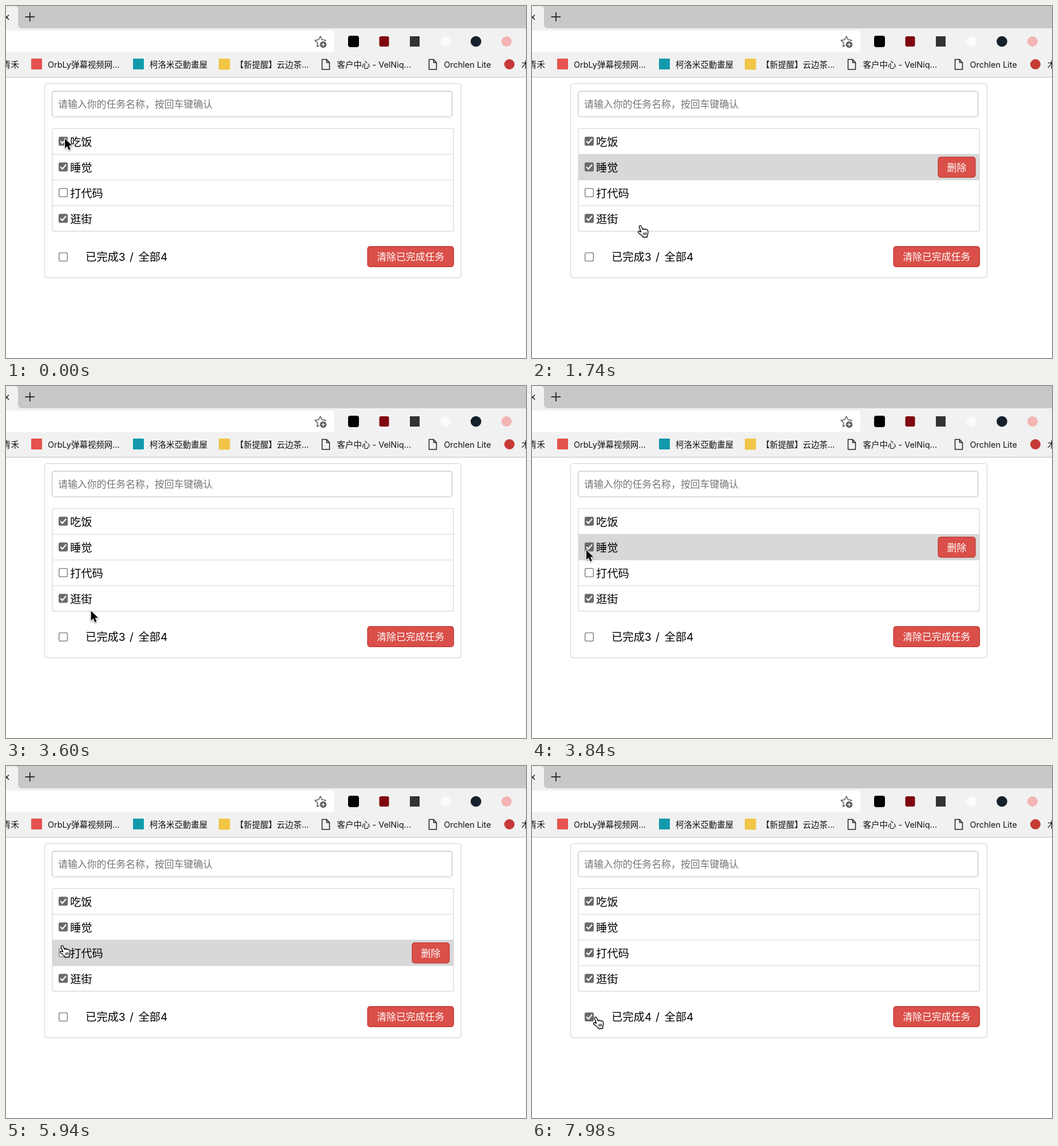
Write an HTML page with a canvas that moves like this. It is 909 px wide and 616 px high and loops after 8 s.

```html
<!DOCTYPE html>
<html lang="zh">
<head>
<meta charset="utf-8">
<title>任务列表</title>
<style>
html, body { margin: 0; width: 100%; height: 100%; overflow: hidden; background: #fff; }
canvas { display: block; }
</style>
</head>
<body>
<canvas id="stage" width="909" height="616"></canvas>
<script>
const ctx = document.getElementById('stage').getContext('2d');
const LOOP = 8000, STEP = 60;
const FONT = 'Inter, "Noto Sans CJK SC", "Noto Sans CJK", sans-serif';
const TASKS = ['吃饭', '睡觉', '打代码', '逛街'];
const ROW_TOP = 214.5, ROW_H = 45;

// Pointer tip: time, x, y
const PATH = [
  [0, 103, 232], [240, 103, 232], [420, 101, 229], [1200, 101, 229],
  [1440, 160, 274], [1620, 180, 292], [1740, 189, 384], [1860, 191, 464],
  [2640, 192, 462], [2880, 192, 451], [3360, 192, 449], [3540, 162, 420],
  [3840, 95, 287], [3960, 97, 271], [5220, 97, 271], [5520, 98, 314],
  [6960, 98, 314], [7080, 98, 320], [7200, 101, 358], [7440, 108, 424],
  [7740, 111, 439], [8000, 111, 439]
];
// Hovered row from each time on, -1 for none
const HOVER = [[0, -1], [240, 0], [1380, 1], [1800, -1], [3720, 1], [5400, 2], [7260, 3], [7440, -1]];
// Checkbox clicks: time, row
const CLICKS = [[600, 0], [1140, 0], [4260, 1], [4860, 1], [6000, 2], [6480, 2], [7860, 2]];

function pointerAt(t) {
  const i = Math.max(1, PATH.findIndex(p => p[0] >= t));
  const [t0, x0, y0] = PATH[i - 1], [t1, x1, y1] = PATH[i];
  const k = (t - t0) / (t1 - t0);
  return [x0 + (x1 - x0) * k, y0 + (y1 - y0) * k];
}

function box(x, y, w, h, r, fill, stroke, lw = 1.2) {
  ctx.beginPath();
  ctx.roundRect(x, y, w, h, r);
  if (fill) { ctx.fillStyle = fill; ctx.fill(); }
  if (stroke) { ctx.strokeStyle = stroke; ctx.lineWidth = lw; ctx.stroke(); }
}

function disc(x, y, r, fill) {
  ctx.beginPath();
  ctx.arc(x, y, r, 0, Math.PI * 2);
  ctx.fillStyle = fill;
  ctx.fill();
}

function line(points, color, lw) {
  ctx.beginPath();
  points.forEach(([x, y]) => ctx.lineTo(x, y));
  ctx.strokeStyle = color;
  ctx.lineWidth = lw;
  ctx.stroke();
}

// y is the middle of the line
function text(s, x, y, size, color = '#000', align = 'left') {
  ctx.font = `${size}px ${FONT}`;
  ctx.textAlign = align;
  ctx.fillStyle = color;
  ctx.fillText(s, x, y + size * 0.38);
}

function docIcon(x) {
  const p = new Path2D('M1 1H9L14 6.5V18.5H1ZM9 1V6.5H14');
  ctx.save();
  ctx.translate(x, 92.5);
  ctx.strokeStyle = '#222';
  ctx.lineWidth = 1.5;
  ctx.stroke(p);
  ctx.restore();
}

function starIcon() {
  ctx.beginPath();
  for (let i = 0; i < 10; i++) {
    const a = -Math.PI / 2 + i * Math.PI / 5, r = i % 2 ? 5 : 10;
    ctx.lineTo(549.5 + r * Math.cos(a), 63 + r * Math.sin(a));
  }
  ctx.closePath();
  ctx.lineJoin = 'round';
  ctx.strokeStyle = '#5c5c5c';
  ctx.lineWidth = 1.5;
  ctx.stroke();
  disc(554.5, 67.5, 7, '#fff');
  disc(554.5, 67.5, 5.7, '#5c5c5c');
  line([[551.3, 67.5], [557.7, 67.5]], '#fff', 1.3);
  line([[554.5, 64.3], [554.5, 70.7]], '#fff', 1.3);
}

function browser() {
  ctx.fillStyle = '#c8c8c8';
  ctx.fillRect(0, 0, 909, 39);
  ctx.fillStyle = '#f1f1f1';
  ctx.fillRect(0, 39, 909, 85);
  ctx.fill(new Path2D('M0 0H15Q21 0 21 6V32Q21 39 28 39H0Z'));
  ctx.fillStyle = '#c9c9c9';
  ctx.fillRect(0, 124, 909, 1.3);
  line([[-3, 15.5], [5, 24]], '#222', 1.6);
  line([[-3, 24], [5, 15.5]], '#222', 1.6);
  line([[33.5, 19], [50, 19]], '#222', 1.8);
  line([[41.8, 11], [41.8, 27]], '#222', 1.8);

  box(-10, 43, 584, 37.5, 5, '#fff');
  starIcon();
  box(598, 52, 19, 20, 4, '#000');
  box(652.5, 53, 17, 18, 3, '#80060f');
  box(706, 53, 17, 18, 0, '#333');
  disc(768, 62, 9, '#fbfbfb');
  disc(821.5, 62, 9.3, '#14202b');
  disc(875, 62, 9, '#f3b4b3');

  box(44, 92, 19, 19, 1, '#e5534f');
  box(222, 92, 19, 19, 1, '#129aac');
  box(372, 92, 19.5, 19.5, 1, '#f2c547');
  docIcon(551.5);
  docIcon(738.5);
  disc(880, 102, 9, '#c63a36');
  const label = (s, x, align) => text(s, x, 102, 14.48, '#111', align);
  label('青禾', 23, 'right');
  label('OrbLy弹幕视频网...', 73);
  label('柯洛米亞動畫屋', 251);
  label('【新提醒】云边茶...', 401);
  label('客户中心 - VelNiq...', 578.5);
  label('Orchlen Lite', 765.5);
  label('木', 901);
}

function checkbox(cy, on) {
  if (!on) return box(92.7, cy - 7.2, 14.6, 14.6, 2.5, '#fff', '#747474', 1.3);
  box(92, cy - 7.8, 16, 15.8, 2.8, '#6b6b6b');
  ctx.lineJoin = 'miter';
  line([[95.2, cy + 0.3], [98.6, cy + 3.6], [105, cy - 4]], '#fff', 2.2);
}

function button(s, x, y, w) {
  box(x + 0.5, y + 0.5, w - 1, 35.5, 4.5, '#da4f49', '#bd362f');
  text(s, x + w / 2, y + 18.3, 16.9, '#fff', 'center');
}

function app(done, hover) {
  box(67.5, 135.7, 728, 340, 5, '#fff', '#d6d6d6');
  box(80.7, 149.2, 699, 44.8, 4.5, '#fff', '#bfbfbf');
  text('请输入你的任务名称，按回车键确认', 91, 171.5, 16.9, '#757575');

  box(81, ROW_TOP, 701.3, ROW_H * 4 - 0.3, 2, '#fff', '#d6d6d6');
  TASKS.forEach((name, i) => {
    const y = ROW_TOP + ROW_H * i;
    if (i) line([[81, y], [782, y]], '#d6d6d6', 1.2);
  });
  if (hover >= 0) {
    ctx.fillStyle = '#d8d8d8';
    ctx.fillRect(81, ROW_TOP + ROW_H * hover - 0.5, 701.3, ROW_H + 1);
    button('删除', 709.5, ROW_TOP + ROW_H * hover + 4.3, 66);
  }
  TASKS.forEach((name, i) => {
    const y = ROW_TOP + ROW_H * i;
    checkbox(y + 22, done[i]);
    text(name, 112, y + 23, 19.3);
  });

  const count = done.filter(Boolean).length;
  checkbox(439, count === TASKS.length);
  text('已完成' + count, 139, 438.7, 19.3);
  text('/', 216, 438.7, 19.3);
  text('全部' + TASKS.length, 231.5, 438.7, 19.3);
  button('清除已完成任务', 631.5, 420.3, 151.5);
}

const ARROW = new Path2D('M0 0V17L4 13.4L6.8 20L9.8 18.7L7 12.3H12.4Z');
const HAND = new Path2D('M6.5 12.5L3.2 3.8C2.4 1.5 5.4 0 6.6 2.4L9.2 8C9.8 6.5 12 6.8 12.4 8.2C13 7 15 7.3 15.4 8.8C16.4 7.8 18 8.6 18.3 10.2C19 13 18.8 15 17.6 17.5L17.3 21L10 21.6L9.2 19.5C7 18 5 15.8 2.5 14.2C.6 13 1.2 10.9 3 11C4.5 11.1 5.5 11.8 6.5 12.5Z');
const CREASES = new Path2D('M10.7 13.5L11.2 18M13 13.3L13.4 17.8M15.3 13.1L15.5 17.6');

function pointer(x, y, hand) {
  ctx.save();
  ctx.translate(hand ? x - 4.8 : x, hand ? y - 1 : y);
  ctx.lineJoin = 'round';
  ctx.shadowColor = 'rgba(0,0,0,.35)';
  ctx.shadowBlur = 3;
  ctx.shadowOffsetY = 1.5;
  ctx.fillStyle = ctx.strokeStyle = '#fff';
  ctx.lineWidth = 2.2;
  if (hand) ctx.fill(HAND);
  else ctx.stroke(ARROW);
  ctx.shadowColor = 'transparent';
  if (hand) {
    ctx.strokeStyle = '#000';
    ctx.lineWidth = 1.3;
    ctx.stroke(HAND);
    ctx.lineWidth = 1.1;
    ctx.stroke(CREASES);
  } else {
    ctx.fillStyle = '#000';
    ctx.fill(ARROW);
  }
  ctx.restore();
}

function draw(t) {
  const done = [true, true, false, true];
  CLICKS.forEach(([at, row]) => { if (t >= at) done[row] = !done[row]; });
  const hover = HOVER.filter(h => t >= h[0]).pop()[1];
  const hand = (t >= 300 && t < 1800) || t >= 3900;
  ctx.fillStyle = '#fff';
  ctx.fillRect(0, 0, 909, 616);
  browser();
  app(done, hover);
  pointer(...pointerAt(t), hand);
}

const start = performance.now();
function tick() {
  const t = (performance.now() - start) % LOOP;
  draw(Math.floor(t / STEP) * STEP);
  requestAnimationFrame(tick);
}
tick();
</script>
</body>
</html>
```
